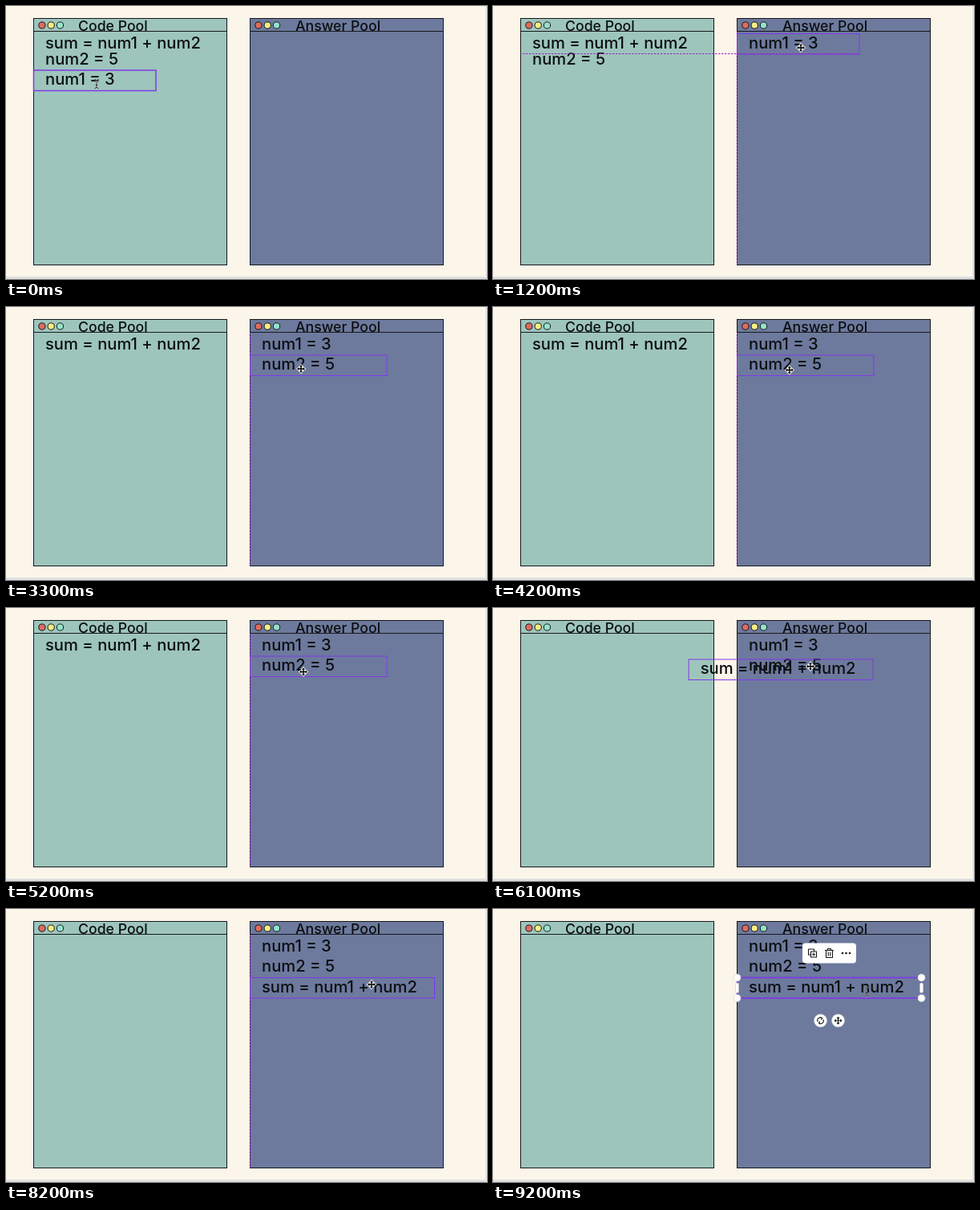
These frames come from a looping animation (600x340 px, 9300 ms). An HTML page:

```html
<!DOCTYPE html>
<html lang="en">
<head>
<meta charset="utf-8">
<title>Code Pool</title>
<style>
  html, body { margin: 0; width: 100%; height: 100%; overflow: hidden; background: #fcf6ea; }
  svg { display: block; width: 600px; height: 340px; }
  text { font: 500 20.2px Inter, sans-serif; fill: #0c0f12; }
  .title { font-size: 17.7px; }
  .line { fill: none; stroke: #17191c; }
  .box { fill: none; stroke: #8038e8; }
  .guide { fill: none; stroke: #9a22cf; stroke-dasharray: 2.5 1.5; }
  .knob { fill: #fff; stroke: #c9ccd4; stroke-width: .6; }
  .icon { fill: none; stroke: #15181c; stroke-width: 1.1; stroke-linejoin: round; stroke-linecap: round; }
</style>
</head>
<body>
<svg viewBox="0 0 600 340">
  <rect width="600" height="340" fill="#fcf6ea"/>
  <path d="M0 337H600V340H0Z" fill="#dfdfe2"/>
  <path d="M599 0V340" stroke="#e6e5e6" stroke-width="2"/>
  <g id="panels"></g>
  <g id="items"></g>
  <g id="ui"></g>
  <g id="cursor"></g>
</svg>
<script>
const LOOP = 9300, STEP = 100, BOX_H = 25.5, LEFT = 34.5, RIGHT = 304.5, PANEL_W = 241;
const $ = id => document.getElementById(id);

// Tracks hold [time, x, y]
const items = [
  { text: 'num1 = 3', w: 152.5, track: [[200, LEFT, 80], [700, 410, 52], [1000, RIGHT, 34.5]] },
  { text: 'num2 = 5', w: 170.5, track: [[2200, LEFT, 54.5], [2700, 372, 64], [3000, 310, 60], [3100, RIGHT, 60]] },
  { text: 'sum = num1 + num2', w: 230, track: [[5800, LEFT, 34.5], [6300, 358, 80], [6600, 321, 85.5],
    [6700, 316.5, 85.5], [7500, 316.5, 85.5], [7800, RIGHT, 85.5]] }
];
const pointer = [[200, 113, 97], [700, 489, 69], [1000, 384, 52], [1400, 384, 52], [1900, 113, 72], [2200, 113, 75],
  [2700, 440, 84], [3000, 374, 78], [3200, 368, 77], [3800, 368, 77], [4500, 371, 79.5], [5300, 371, 79.5],
  [5600, 186, 46], [5800, 186, 43], [6300, 510, 89], [6600, 473, 94], [6700, 468, 94], [7500, 468, 94],
  [7800, 456, 94], [8300, 456, 94], [8700, 466, 103]];
const phases = [[0, 0, 'hover'], [200, 0, 'drag'], [1400, 0, 'selected'], [1800, 1, 'idle'], [1900, 1, 'hover'],
  [2100, 1, 'press'], [2300, 1, 'drag'], [5300, 1, 'selected'], [5500, 2, 'hover'], [5700, 2, 'press'],
  [5900, 2, 'drag'], [8300, 2, 'selected']];

function at(track, t) {
  const i = track.findIndex(k => k[0] > t);
  if (i === 0) return track[0].slice(1);
  if (i < 0) return track[track.length - 1].slice(1);
  const a = track[i - 1], b = track[i], u = (t - a[0]) / (b[0] - a[0]), e = u * u * (3 - 2 * u);
  return [1, 2].map(n => a[n] + (b[n] - a[n]) * e);
}

function panel(x, fill, title, titleX) {
  const dots = ['#de6b60', '#f7ee82', '#92e3c9'].map((c, i) =>
    `<circle class="line" cx="${x + 10.4 + i * 11.3}" cy="24" r="4.1" style="fill:${c}"/>`).join('');
  return `<rect class="line" x="${x}" y="15.5" width="${PANEL_W}" height="307" style="fill:${fill}"/>
    <path class="line" d="M${x} 31.5h${PANEL_W}"/>${dots}<text class="title" x="${titleX}" y="31">${title}</text>`;
}

const circle = (x, y, r) => `<circle class="knob" cx="${x}" cy="${y}" r="${r}"/>`;
const icon = (x, y, d) => `<path class="icon" transform="translate(${x} ${y})" d="${d}"/>`;
const outline = (x, y, w, width) =>
  `<rect class="box" x="${x}" y="${y}" width="${w}" height="${BOX_H}" stroke-width="${width}"/>`;

function toolbar(x, y) {
  return `<rect x="${x - 33.5}" y="${y}" width="67" height="25" rx="4" fill="#fff"/>` +
    icon(x - 21, y + 12.5, 'M-2 -2H5V5H-2ZM-2 2H-5V-5H2V-2M1.5 0V3M0 1.5H3') +
    icon(x, y + 12.5, 'M-5 -3.5H5M-2 -3.5V-5.5H2V-3.5M-4 -3.5V5.5H4V-3.5M-1.3 -1V3M1.3 -1V3') +
    [-4.5, 0, 4.5].map(d => `<circle cx="${x + 21 + d}" cy="${y + 12.5}" r="1.3" fill="#15181c"/>`).join('');
}

function selection(x, y, w) {
  const cx = x + w / 2, bottom = y + BOX_H, below = bottom + 28;
  const ends = [x, x + w].map(ex => circle(ex, y, 4.5) + circle(ex, bottom, 4.5) +
    `<rect class="knob" x="${ex - 2}" y="${y + 6.5}" width="4" height="12.5" rx="2"/>`).join('');
  return outline(x, y, w, 1.7) + ends + circle(cx - 11, below, 8) + circle(cx + 11, below, 8) +
    icon(cx - 11, below, 'M-3.5 1A3.5 3.5 0 0 1 2 -3M.5 -4L2.2 -3L1 -1.4M3.5 -1A3.5 3.5 0 0 1 -2 3M-.5 4L-2.2 3L-1 1.4') +
    icon(cx + 11, below, 'M-4 0H4M0 -4V4M-1.2 -3L0 -4.2L1.2 -3M-1.2 3L0 4.2L1.2 3M-3 -1.2L-4.2 0L-3 1.2M3 -1.2L4.2 0L3 1.2') +
    (y > 43 ? toolbar(cx, y - 43) : '');
}

function dragging(x, y, w) {
  const guide = d => `<path class="guide" d="${d}"/>`;
  let out = outline(x, y, w, 1);
  if (x === RIGHT) out += guide(`M${RIGHT} 32V322`);
  if (x + w === RIGHT + 242) out += guide(`M${x + w} 15V322`);
  if (x === RIGHT && y === 34.5) out += guide(`M37 ${y + BOX_H - .5}H${x + w}`);
  return out;
}

const views = {
  idle: () => '',
  hover: (x, y, w) => outline(x, y, w, 1.5),
  drag: dragging,
  press: selection,
  selected: selection
};

const beam = 'M-2.5 -5.5Q0 -5.5 0 -4Q0 -5.5 2.5 -5.5M0 -4V4M-2.5 5.5Q0 5.5 0 4Q0 5.5 2.5 5.5M-1.2 1.5H1.2';
const arrows = 'M0 -5L2 -2.7H.7V-.7H2.7V-2L5 0L2.7 2V.7H.7V2.7H2L0 5L-2 2.7H-.7V.7H-2.7V2L-5 0L-2.7 -2V-.7H-.7V-2.7H-2Z';

function drawCursor(x, y, moving) {
  const place = `transform="translate(${x} ${y})" d="${moving ? arrows : beam}"`;
  return moving
    ? `<path ${place} fill="#000" stroke="#fff" stroke-width="1.6" paint-order="stroke"/>`
    : `<path ${place} fill="none" stroke="#fff" stroke-width="2" opacity=".6"/><path ${place} fill="none" stroke="#222"/>`;
}

$('panels').innerHTML = panel(LEFT, '#9ec5bc', 'Code Pool', 90) + panel(RIGHT, '#6d7a9d', 'Answer Pool', 361);
$('items').innerHTML = items.map(i => `<text>${i.text}</text>`).join('');

function render(t) {
  items.forEach((item, i) => {
    [item.x, item.y] = at(item.track, t);
    const node = $('items').children[i];
    node.setAttribute('x', item.x + 14.5);
    node.setAttribute('y', item.y + 18);
  });
  const [, index, mode] = phases.filter(p => p[0] <= t).pop();
  const { x, y, w } = items[index];
  $('ui').innerHTML = views[mode](x, y, w);
  $('cursor').innerHTML = drawCursor(...at(pointer, t), mode === 'drag' || mode === 'press');
}

let shown = -1;
function tick() {
  const t = Math.floor(performance.now() % LOOP / STEP) * STEP;
  if (t !== shown) render(shown = t);
  requestAnimationFrame(tick);
}
tick();
</script>
</body>
</html>
```
